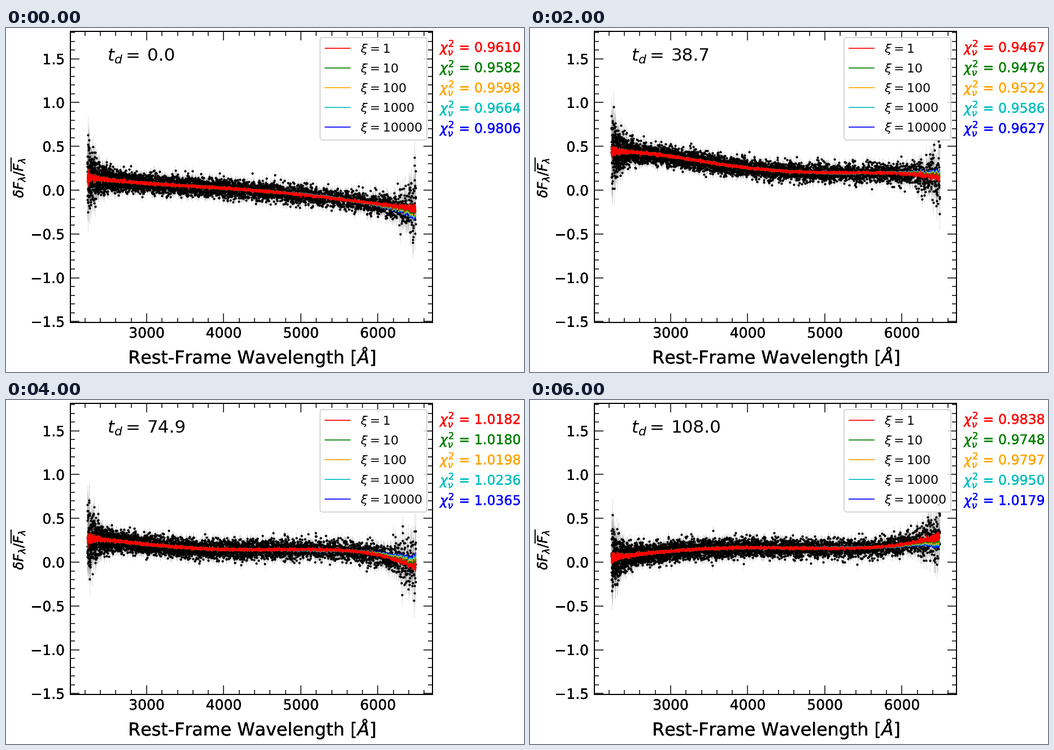
A matplotlib script that plays this animation: 917 by 611 pixels, repeating every 6.2 s.

```python
import matplotlib.pyplot as plt
import numpy as np
from matplotlib.animation import FuncAnimation
from matplotlib.collections import LineCollection
from matplotlib.patheffects import Normal
from matplotlib.ticker import AutoMinorLocator

W, H, DPI = 917, 611, 72
FRAMES, STEP = 31, 200
LEFT, RIGHT, TOP, BOTTOM = 114, 755, 6, 523
BLUE_END, RED_END = 2230, 6490
COLORS = ["red", "green", "orange", "c", "blue"]
HEAVY = [Normal()] * 4  # repeated drawing gives the dense text edges

plt.rcParams["font.family"] = "DejaVu Sans"
plt.rcParams["mathtext.fontset"] = "dejavusans"

# Key epochs: (frame, delay, spread of the fits, continuum at five points, chi squared)
EPOCHS = [
    (0, 0.0, -0.08, (0.15, 0.06, 0.0, -0.095, -0.21), (0.9610, 0.9582, 0.9598, 0.9664, 0.9806)),
    (6, 33.1, 0.36, (0.31, 0.195, 0.14, 0.305, 0.08), (0.9770, 0.9806, 0.9973, 1.0264, 1.0615)),
    (10, 38.7, 0.06, (0.44, 0.345, 0.225, 0.20, 0.14), (0.9467, 0.9476, 0.9522, 0.9586, 0.9627)),
    (15, 55.5, 0.10, (0.10, 0.085, 0.03, 0.018, -0.14), (0.9729, 0.9739, 0.9800, 0.9943, 1.0167)),
    (20, 74.9, 0.10, (0.27, 0.18, 0.142, 0.14, -0.06), (1.0182, 1.0180, 1.0198, 1.0236, 1.0365)),
    (26, 92.4, -0.22, (0.25, 0.255, 0.305, 0.42, 0.82), (0.9466, 0.9481, 0.9533, 0.9649, 0.9950)),
    (30, 108.0, -0.08, (0.05, 0.145, 0.163, 0.16, 0.30), (0.9838, 0.9748, 0.9797, 0.9950, 1.0179)),
]
KEYS, DELAY, SPREAD, SHAPE, CHI = (np.array(col) for col in zip(*EPOCHS))

wave = np.geomspace(BLUE_END, RED_END, 4600)
unit = 2 * (wave - BLUE_END) / (RED_END - BLUE_END) - 1


def at(frame, values):
    """Interpolate one value, or a row of values, between the epochs."""
    if values.ndim == 1:
        return np.interp(frame, KEYS, values)
    return np.array([np.interp(frame, KEYS, col) for col in values.T])


def spectrum(frame):
    """Return data, errors and one fit per xi."""
    rng = np.random.default_rng(100 + frame)
    spread = at(frame, SPREAD)
    wide = abs(spread)
    poly = np.polyfit(np.linspace(-1, 1, 5), at(frame, SHAPE), 4)
    mean = np.polyval(poly, unit)

    # Errors rise at both ends, more so where the fits disagree
    err = (0.05 + 0.05 * wide
           + 0.9 * wide ** 3 * np.clip((wave - 4000) / 1500, 0, 1)
           + 0.17 * np.exp((BLUE_END - wave) / 100)
           + (0.09 + 0.7 * wide) * np.exp((wave - RED_END) / 180))
    data = mean + err * rng.standard_normal(wave.size)
    jitter = 0.15 * err * rng.standard_normal(wave.size)

    drift = spread * (np.exp((wave - RED_END) / 300)
                      - 0.13 * np.exp(-((wave - 5250) / 400) ** 2))
    fits = [mean + jitter + drift * k / 4 for k in range(5)]
    return data, err, fits


fig = plt.figure(figsize=(W / DPI, H / DPI), dpi=DPI, facecolor="white")
ax = fig.add_axes([LEFT / W, 1 - BOTTOM / H, (RIGHT - LEFT) / W, (BOTTOM - TOP) / H])
ax.set_xlim(2011, 6707)
ax.set_ylim(-1.511, 1.813)
ax.set_xticks(range(3000, 7000, 1000))
ax.set_yticks(np.arange(-1.5, 1.6, 0.5))
ax.xaxis.set_minor_locator(AutoMinorLocator(5))
ax.yaxis.set_minor_locator(AutoMinorLocator(5))
ax.tick_params(which="both", direction="in", top=True, right=True, width=1.5)
ax.tick_params(which="major", length=16, labelsize=25)
ax.tick_params(which="minor", length=8)
ax.tick_params(axis="x", pad=8)
ax.tick_params(axis="y", pad=10)
for spine in ax.spines.values():
    spine.set_linewidth(2)
for label in ax.get_xticklabels() + ax.get_yticklabels():
    label.set_path_effects(HEAVY)


def put(x, y, text, size, heavy=True, **kw):
    kw.setdefault("va", "baseline")
    t = fig.text(x / W, 1 - y / H, text, fontsize=size, **kw)
    if heavy:
        t.set_path_effects(HEAVY)
    return t


put(436, 596, "Rest-Frame Wavelength [$Å$]", 31.7, ha="center")
put(20.5, 265, r"$\delta F_{\lambda}/\overline{F_{\lambda}}$", 24,
    ha="center", va="center", rotation=90)
put(179, 58.5, "$t_d =$", 31, heavy=False)
delay = put(250, 58.5, "", 31, heavy=False)
chis = [put(768, 42.5 + 36 * k, "", 23.6, color=c) for k, c in enumerate(COLORS)]

bars = LineCollection([], colors="0.5", alpha=0.25, linewidths=1, zorder=1.5)
ax.add_collection(bars, autolim=False)
dots, = ax.plot([], [], "o", color="black", ms=4.2, mew=0, zorder=2)
# Fits lie above the legend, the data below it
lines = [ax.plot([], [], color=c, lw=1.7, zorder=10 - k, label=rf"$\xi = {10 ** k}$")[0]
         for k, c in enumerate(COLORS)]
legend = ax.legend(loc="upper right", bbox_to_anchor=(1.002, 1), fontsize=22, framealpha=0.8)
legend.get_frame().set_linewidth(2)


def update(frame):
    data, err, fits = spectrum(frame)
    low = np.column_stack([wave, data - err])
    high = np.column_stack([wave, data + err])
    bars.set_segments(np.stack([low, high], axis=1))
    dots.set_data(wave, data)
    for line, fit in zip(lines, fits):
        line.set_data(wave, fit)
    delay.set_text(f"{at(frame, DELAY):.1f}")
    for text, value in zip(chis, at(frame, CHI)):
        text.set_text(rf"$\chi^2_\nu$ = {value:.4f}")
    return [bars, dots, delay, *lines, *chis]


anim = FuncAnimation(fig, update, frames=FRAMES, interval=STEP, repeat=True, blit=False)
plt.show()
```
